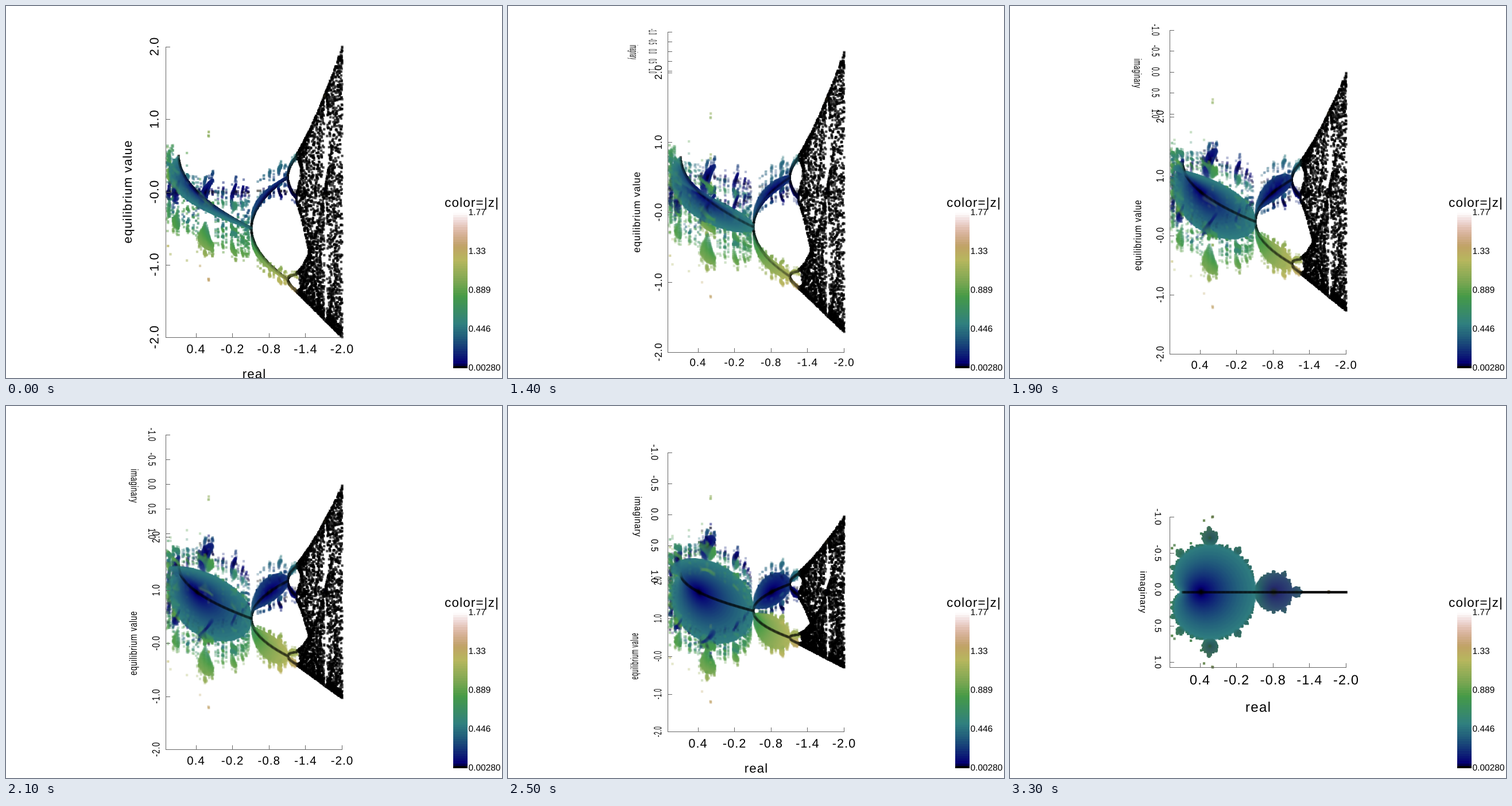
These frames come from a looping animation (864 by 648 pixels, 4400 ms). A matplotlib script:

```python
from functools import lru_cache

import numpy as np
import matplotlib.pyplot as plt
from matplotlib.animation import FuncAnimation
from matplotlib.patches import PathPatch
from matplotlib.path import Path
from matplotlib.textpath import TextPath

W, H = 864, 648
SS = 0.84375                     # stage pixels per canvas pixel
CH, X0, CW = 768, 320, 400       # canvas height, left edge, width
UNIT, MID = 150, 384             # canvas pixels per unit, centre row
DOT = 2                          # half width of a square point
STEPS = 23
IM_MAX, Z_MAX = 1.035, 2.0
LEFT, RIGHT = 278, 585
CMAP = plt.get_cmap("gist_earth", 64)
LOW, HIGH = 0.0028, 1.77


# ---- data: attracting cycles of z -> z^2 + c ----
def complex_cycles(max_period=16, pitch=0.0075):
    re, im = np.meshgrid(np.arange(-1.9945, 0.45, pitch),
                         np.arange(0.004, 1.2, pitch))
    c = (re + 1j * im).ravel()
    z = np.zeros_like(c)
    with np.errstate(all="ignore"):
        for k in range(2000):
            z = z * z + c
            if k % 8 == 7:
                keep = np.abs(z) < 2.5
                c, z = c[keep], z[keep]
        w, period = z.copy(), np.zeros(len(c), int)
        for p in range(1, max_period + 1):
            w = w * w + c
            period[(np.abs(w - z) < 1e-3) & (period == 0)] = p
    c, w, period = c[period > 0], z[period > 0], period[period > 0]
    cs, zs = [], []
    for p in range(max_period):
        m = period > p
        cs.append(c[m])
        zs.append(w[m])
        w = w * w + c
    c, z = np.concatenate(cs), np.concatenate(zs)
    return np.concatenate([c, c.conj()]), np.concatenate([z, z.conj()])


def real_orbits(n=1800, burn=600, keep=7):
    """Distinct values each real orbit visits after settling."""
    c = np.linspace(-2, 0.25, n)
    x = np.zeros(n)
    for _ in range(burn):
        x = x * x + c
    seen, cs, xs = [x], [c], [x]
    for _ in range(keep - 1):
        x = x * x + c
        new = np.min(np.abs(np.array(seen) - x), axis=0) > 1e-3
        seen.append(x)
        cs.append(c[new])
        xs.append(x[new])
    return np.concatenate(cs), np.concatenate(xs)


cc, cz = complex_cycles()
rc, rz = real_orbits()
re = np.concatenate([cc.real, rc])
im = np.concatenate([cc.imag, 0 * rc])
val = np.concatenate([cz.real, rz])
shade = CMAP((np.abs(cz) - LOW) / (HIGH - LOW))[:, :3]
rgb = np.concatenate([shade, np.zeros((len(rc), 3))])
alpha = np.concatenate([np.full(len(cc), 0.3), np.full(len(rc), 0.7)])
col = np.floor(393.9 - UNIT * re).astype(int) - X0


def spread(a, axis):
    return sum(np.roll(a, s, axis) for s in range(-DOT, DOT + 1))


def cloud(cos, sin):
    """Order-independent blend of translucent squares, nearer ones stronger."""
    row = np.floor(MID - UNIT * (val * cos - im * sin)).astype(int)
    reach = Z_MAX * sin + IM_MAX * cos
    depth = 0.5 - 0.5 * (im * cos + val * sin) / reach
    weight = alpha * (1.1 - depth) ** 2
    layers = [*(rgb * weight[:, None]).T, weight, np.log(1 - alpha)]
    idx = row * CW + col
    acc = np.array([np.bincount(idx, w, CH * CW) for w in layers], np.float32)
    acc = spread(spread(acc.reshape(5, CH, CW), 1), 2)
    mean = acc[:3] / np.maximum(acc[3], 1e-6)
    clear = np.exp(acc[4])
    return np.clip(clear + (1 - clear) * mean, 0, 1).transpose(1, 2, 0)


# ---- text as outlines, so that it can turn with the box ----
ADVANCE = {"-": .333, ".": .278, " ": .278, "r": .333, "l": .222, "i": .222,
           "m": .833, "v": .5, "y": .5, "c": .5, "z": .5, "=": .584, "|": .26}


@lru_cache(None)
def glyph(ch):
    p = TextPath((0, 0), ch, size=100, prop={"family": "Liberation Sans"})
    return p.vertices / 100, p.codes


@lru_cache(None)
def outline(text, gap):
    x, verts, codes = 0, [], []
    for ch in text:
        if ch != " ":
            v, k = glyph(ch)
            verts.append(v + [x, -0.35])
            codes.append(k)
        x += ADVANCE.get(ch, .556) + gap
    return np.concatenate(verts), np.concatenate(codes), x - gap


class Lettering:
    def __init__(self):
        self.verts, self.codes = [], []

    def add(self, text, x, y, size, run=(1, 0), rise=(0, -1), gap=0.05,
            align=0.5):
        v, k, width = outline(text, gap)
        v = (v - [align * width, 0]) * size
        self.verts.append([x, y] + v[:, :1] * np.array(run)
                          + v[:, 1:] * np.array(rise))
        self.codes.append(k)

    def path(self):
        return Path(np.concatenate(self.verts), np.concatenate(self.codes))


# ---- stage ----
fig = plt.figure(figsize=(W / 100, H / 100), dpi=100, facecolor="white")
ax = fig.add_axes([0, 0, 1, 1])
picture = ax.imshow(np.ones((CH, CW, 3)), interpolation="antialiased",
                    extent=(X0 * SS, (X0 + CW) * SS, H, 0), aspect="auto")
ramp = CMAP(np.linspace(1, 0, 64))[:, None, :3]
ax.imshow(ramp, interpolation="nearest", extent=(779, 803.5, 631.5, 361),
          aspect="auto")
frame_line, = ax.plot([], [], color="0.4", lw=0.72, zorder=3)
labels = PathPatch(Path([(0, 0)]), fc="black", lw=0, zorder=4)
ax.add_patch(labels)

legend = Lettering()
legend.add("color=|z|", 811, 342, 22.5)
for n, text in enumerate(["1.77", "1.33", "0.889", "0.446", "0.00280"]):
    legend.add(text, 805.5, 358.8 + 67.7 * n, 15.5, gap=0, align=0)
ax.add_patch(PathPatch(legend.path(), fc="black", lw=0, zorder=4))

ax.set_xlim(0, W)
ax.set_ylim(H, 0)
ax.axis("off")

X_TICKS = list(zip(np.linspace(330.5, RIGHT, 5),
                   ["0.4", "-0.2", "-0.8", "-1.4", "-2.0"]))
Z_TICKS = list(zip([2, 1, 0, -1, -2], ["2.0", "1.0", "-0.0", "-1.0", "-2.0"]))
IM_TICKS = list(zip(np.arange(5) * 0.5,
                    ["-1.0", "-0.5", "0.0", "0.5", "1.0"]))
EM = 1.08                        # font size per unit of label offset


def update(i):
    step = min(max(i - 10, 0), STEPS)
    angle = np.radians(90 * step / STEPS)
    cos, sin = np.cos(angle), np.sin(angle)
    picture.set_data(cloud(cos, sin))

    unit = UNIT * SS
    top = H / 2 - unit * (Z_MAX * cos + IM_MAX * sin)
    bottom = H - top
    corner = top + 2 * unit * IM_MAX * sin

    u = (step - 1) / (STEPS - 1)
    if step:
        x_size, z_size, im_size = 16.8 + 5 * u, 16 + 2.2 * u, 19 - 4.7 * u
    else:
        x_size = z_size = im_size = 20

    segs = [(LEFT, top, LEFT, bottom), (LEFT, bottom, RIGHT, bottom)]
    text = Lettering()

    for x, name in X_TICKS:
        segs.append((x, bottom, x, bottom - 7))
        text.add(name, x, bottom + x_size, x_size * EM)
    text.add("real", 432, bottom + 3.17 * x_size, x_size * EM * 1.03)

    if cos > 0.01:
        look = dict(size=z_size * EM, run=(0, -cos), rise=(-1, 0))
        for z, name in Z_TICKS:
            y = corner + (Z_MAX - z) * unit * cos
            segs.append((LEFT, y, LEFT + 7, y))
            text.add(name, LEFT - z_size, y, **look)
        text.add("equilibrium value", LEFT - 3.33 * z_size,
                 (corner + bottom) / 2, **look)

    if sin > 0.01:
        look = dict(size=im_size * EM, run=(0, sin), rise=(1, 0))
        for d, name in IM_TICKS:
            y = top + d * unit * sin
            segs.append((LEFT, y, LEFT + 7, y))
            text.add(name, LEFT - 1.4 * im_size, y, **look)
        text.add("imaginary", LEFT - 3.2 * im_size, (top + corner) / 2, **look)

    xs = [v for a, _, b, _ in segs for v in (a, b, np.nan)]
    ys = [v for _, a, _, b in segs for v in (a, b, np.nan)]
    frame_line.set_data(xs, ys)
    labels.set_path(text.path())
    return picture, frame_line, labels


anim = FuncAnimation(fig, update, frames=44, interval=100, repeat=True,
                     repeat_delay=0, cache_frame_data=False)
plt.show()
```
